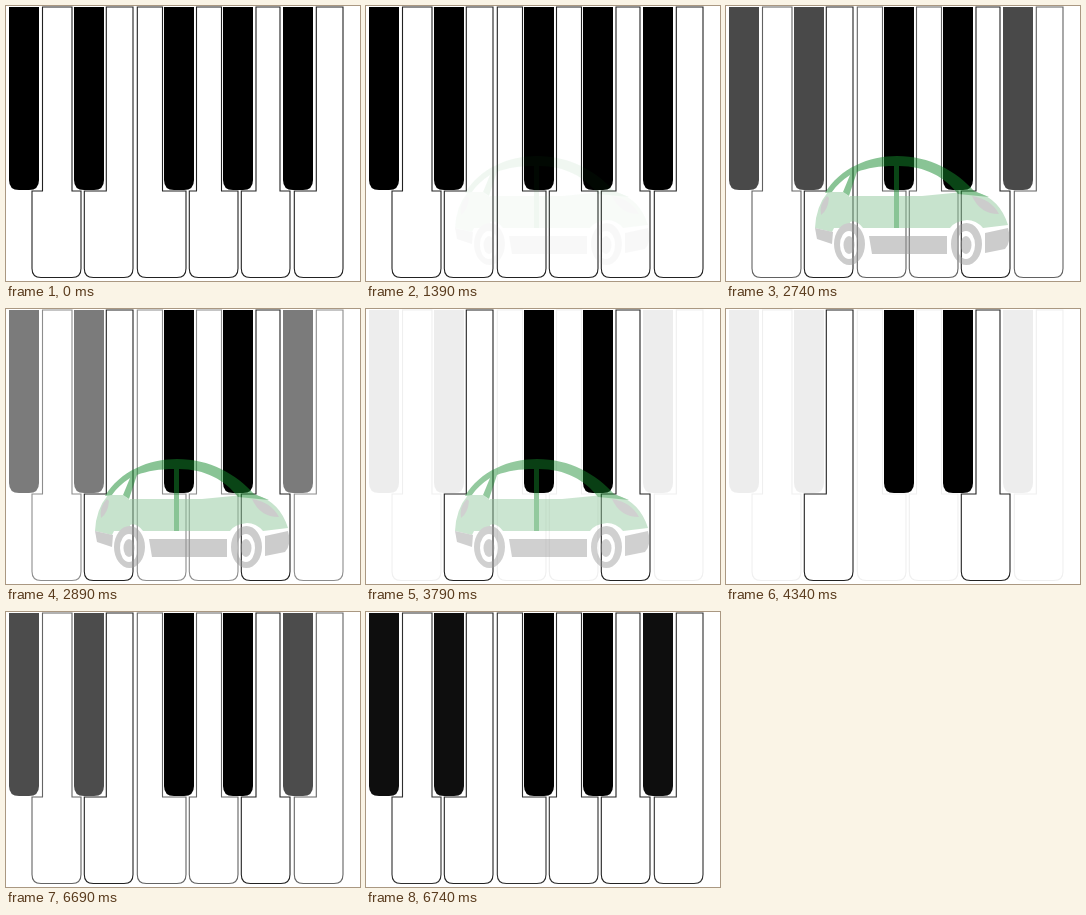
Animation, 354 px wide and 275 px high, one loop 6.79 s. Source, as an HTML page:

```html
<!DOCTYPE html>
<html lang="en">
<head>
<meta charset="utf-8">
<title>Piano keys</title>
<style>
  html, body { margin: 0; width: 100%; height: 100%; overflow: hidden; background: #fff; }
  svg { display: block; width: 354px; height: 275px; }
  .white { fill: #fff; stroke: #222; stroke-width: 1.1; }
  .black { fill: #000; }
  .fading { animation: keys 6790ms infinite; }
  .car { opacity: 0; animation: car 6790ms infinite; }
  .roof { fill: #148a2c; }
  .body { fill: #8fc79b; }
  .trim { fill: #999; }

  /* Both fades advance in ticks of 50 ms. */
  @keyframes car {
    0% { opacity: 0; }
    19.732% { opacity: 0; animation-timing-function: steps(8); }
    25.623% { opacity: .5; }
    55.078% { opacity: .5; animation-timing-function: steps(12); }
    63.914%, 100% { opacity: 0; }
  }
  @keyframes keys {
    0% { opacity: 1; }
    35.932% { opacity: 1; animation-timing-function: step-end; }
    36.668% { opacity: .97; animation-timing-function: steps(5); }
    40.350% { opacity: .71; animation-timing-function: steps(3); }
    42.559% { opacity: .514; animation-timing-function: steps(5); }
    46.241% { opacity: .23; animation-timing-function: steps(5); }
    49.923% { opacity: .07; }
    96.315% { opacity: .07; animation-timing-function: step-end; }
    97.051% { opacity: .082; animation-timing-function: step-end; }
    97.787% { opacity: .33; animation-timing-function: step-end; }
    98.524% { opacity: .7; animation-timing-function: step-end; }
    99.260% { opacity: .945; animation-timing-function: step-end; }
    100% { opacity: 1; }
  }
</style>
</head>
<body>
<svg viewBox="0 0 354 275">
  <g id="keys"></g>
  <g class="car">
    <path class="body" d="M102 186 L117 186 L124 191 L124 222 L108 222 L106 226 L89 222 Q90 200 102 186Z"/>
    <path class="body" d="M124 190 H168 V222 H137 Q130 213 124 216Z"/>
    <path class="body" d="M173 190 H183 L196 190 L237 186 L250 186 Q274 193 282 219 L257 222 Q250 214 241 214 Q229 215 224 222 H173Z"/>
    <path class="roof" fill-rule="evenodd" d="M99 187 C114 162 143 150 171 150 C204 150 230 165 248 185 L263 191 L232 188 C219 171 199 160 173 160 V222 H168 V160 C154 160 141 162 131 166 L123 190 L117 186 L124 169 C116 174 110 180 106 186Z"/>
    <path class="trim" d="M101 190 Q93 198 95 209 Q102 204 103 192Z"/>
    <path class="trim" d="M246 190 Q265 193 273 208 Q254 208 246 190Z"/>
    <path class="trim" d="M89 222 L107 226 L106 238 L91 233Z"/>
    <path class="trim" d="M143 230 H221 V248 H146Z"/>
    <path class="trim" d="M259 227 L282 222 Q286 235 279 243 L259 247Z"/>
    <g class="trim" fill-rule="evenodd">
      <path d="M108 238 a15.5 21 0 1 0 31 0 a15.5 21 0 1 0 -31 0Z M114 239 a9 14 0 1 0 18 0 a9 14 0 1 0 -18 0Z"/>
      <path d="M225 238 a15.5 21 0 1 0 31 0 a15.5 21 0 1 0 -31 0Z M231 239 a9 14 0 1 0 18 0 a9 14 0 1 0 -18 0Z"/>
      <ellipse cx="123" cy="239" rx="5.5" ry="9"/>
      <ellipse cx="240" cy="239" rx="5.5" ry="9"/>
    </g>
  </g>
</svg>
<script>
  const keys = document.getElementById('keys');

  function addKey(kind, d, fades) {
    const path = document.createElementNS('http://www.w3.org/2000/svg', 'path');
    path.setAttribute('class', kind + (fades ? ' fading' : ''));
    path.setAttribute('d', d);
    keys.append(path);
  }

  // Stem left and right, base left and right, whether it fades
  const whites = [
    [36.5, 66, 26, 75, true],
    [100.3, 127, 78.3, 127, false],
    [131.3, 156.5, 131.3, 180, true],
    [190.5, 215.5, 183.3, 232, true],
    [250, 274, 235.3, 284, false],
    [310.3, 337, 288.3, 337, true]
  ];
  for (const [l, r, bl, br, fades] of whites) {
    addKey('white', `M${l} 1H${r}V185H${br}V262.5q0 9 -9 9H${bl + 9}q-9 0 -9 -9V185H${l}Z`, fades);
  }

  const blacks = [[3, true], [68, true], [158, false], [217, false], [277, true]];
  for (const [x, fades] of blacks) {
    addKey('black', `M${x} 1h30v173q0 10 -10 10h-10q-10 0 -10 -10Z`, fades);
  }
</script>
</body>
</html>
```
